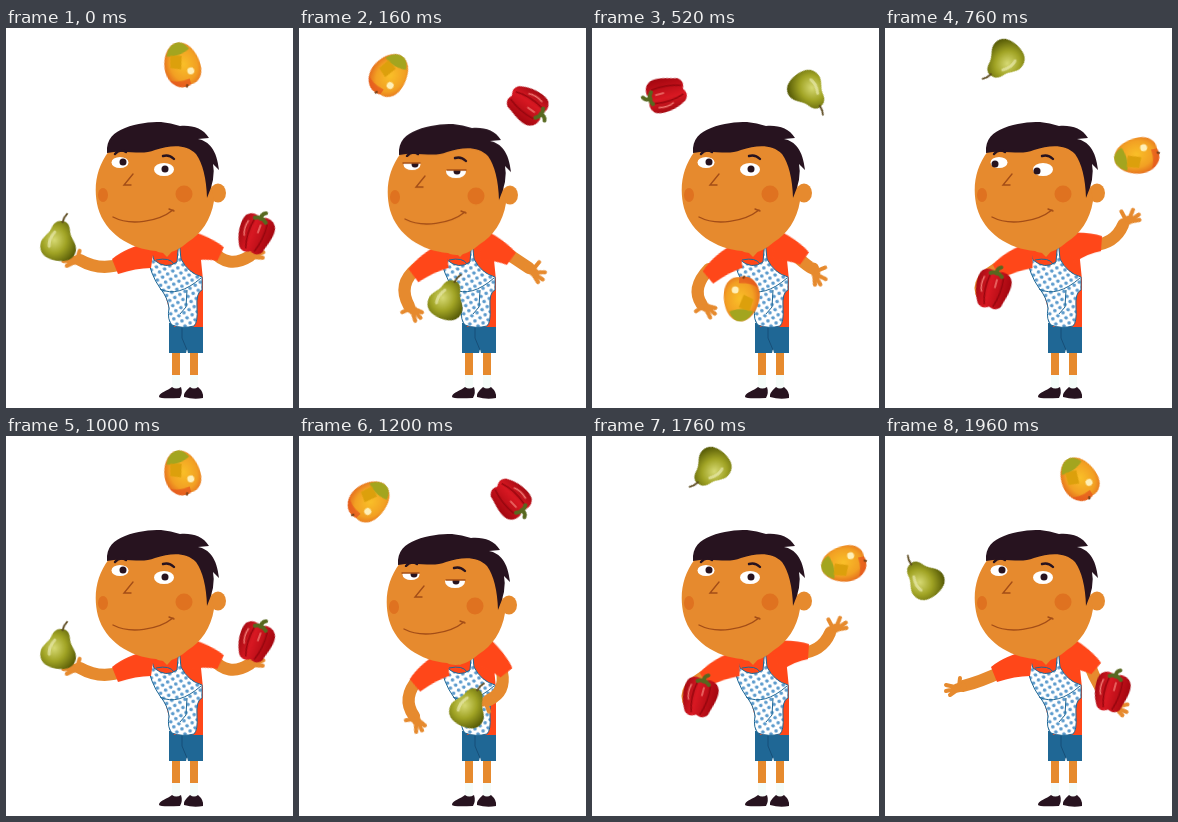
Write an HTML page without scripts that moves like this. It is 287 px wide and 380 px high and loops after 2000 ms.

```html
<!DOCTYPE html>
<html lang="en">
<head>
<meta charset="utf-8">
<title>Juggling boy</title>
<style>
html, body { margin: 0; width: 100%; height: 100%; overflow: hidden; background: #fff; }
svg { display: block; width: 287px; height: 380px; }
.skin { fill: #e68a2e; }
.red { fill: #ff4719; }
.dark { fill: #27131f; }
.line { fill: none; stroke: #a34d17; stroke-width: 1.4; stroke-linecap: round; }
.brow { fill: none; stroke: #27131f; stroke-width: 2.4; stroke-linecap: round; }
.seam { fill: none; stroke: #1f6795; stroke-width: 1; }
.arm { fill: none; stroke: #e68a2e; stroke-width: 12; stroke-linecap: round; }
.hand { fill: none; stroke: #e68a2e; stroke-width: 4; stroke-linecap: round; }
.palm { stroke-width: 9; }

/* motion advances in 40 ms ticks */
.move { animation: 1s -4ms infinite steps(2); }
.mango { animation-name: mango; }
.pepper { animation-name: pepper; }
.pear { animation-name: pear; }
.armL { animation-name: armL; }
.armR { animation-name: armR; }
.handL { animation-name: handL; }
.handR { animation-name: handR; }
.slvL { transform-origin: 147px 222px; animation: slvL 1s linear infinite; }
.slvR { transform-origin: 188px 216px; animation: slvR 1s linear infinite; }
.head { animation: nod 1s linear infinite; }
.half { animation: half 1s -4ms steps(1) infinite; }
.shut { animation: shut 1s -4ms steps(1) infinite; }
.look { animation: look 2s -4ms steps(1) infinite; }

@keyframes mango {
  0% { transform: translate(176px,37px) rotate(165deg); }
  8% { transform: translate(132px,31px) rotate(190deg); }
  16% { transform: translate(90px,47px) rotate(215deg); animation-timing-function: steps(1); }
  20% { transform: translate(70px,65px) rotate(228deg); }
  28% { transform: translate(37px,118px) rotate(280deg); animation-timing-function: steps(1); }
  32% { transform: translate(28px,156px) rotate(305deg); }
  40% { transform: translate(72px,246px) rotate(335deg); }
  48% { transform: translate(124px,271px) rotate(360deg); }
  56% { transform: translate(175px,270px) rotate(370deg); }
  64% { transform: translate(227px,256px) rotate(385deg); }
  72% { transform: translate(254px,165px) rotate(420deg); animation-timing-function: steps(1); }
  76% { transform: translate(252px,128px) rotate(440deg); }
  84% { transform: translate(233px,78px) rotate(475deg); }
  92% { transform: translate(206px,51px) rotate(500deg); animation-timing-function: steps(1); }
  96% { transform: translate(194px,43px) rotate(510deg); animation-timing-function: steps(1); }
  100% { transform: translate(176px,37px) rotate(525deg); }
}
@keyframes pepper {
  0% { transform: translate(250px,204px) rotate(20deg); }
  8% { transform: translate(252px,128px) rotate(75deg); }
  16% { transform: translate(230px,78px) rotate(125deg); animation-timing-function: steps(1); }
  20% { transform: translate(213px,64px) rotate(136deg); }
  28% { transform: translate(186px,42px) rotate(172deg); animation-timing-function: steps(1); }
  32% { transform: translate(167px,38px) rotate(185deg); }
  40% { transform: translate(130px,30px) rotate(207deg); }
  48% { transform: translate(93px,44px) rotate(230deg); }
  56% { transform: translate(51px,90px) rotate(280deg); }
  64% { transform: translate(32px,155px) rotate(325deg); }
  72% { transform: translate(85px,243px) rotate(368deg); animation-timing-function: steps(1); }
  76% { transform: translate(108px,259px) rotate(375deg); }
  84% { transform: translate(155px,270px) rotate(378deg); }
  92% { transform: translate(205px,264px) rotate(376deg); animation-timing-function: steps(1); }
  96% { transform: translate(227px,254px) rotate(375deg); animation-timing-function: steps(1); }
  100% { transform: translate(250px,204px) rotate(380deg); }
}
@keyframes pear {
  0% { transform: translate(54px,209px) rotate(10deg); }
  8% { transform: translate(105px,258px) rotate(15deg); }
  16% { transform: translate(150px,268px) rotate(22deg); animation-timing-function: steps(1); }
  20% { transform: translate(172px,268px) rotate(25deg); }
  28% { transform: translate(225px,258px) rotate(35deg); animation-timing-function: steps(1); }
  32% { transform: translate(244px,241px) rotate(40deg); }
  40% { transform: translate(255px,145px) rotate(85deg); }
  48% { transform: translate(232px,82px) rotate(127deg); }
  56% { transform: translate(205px,50px) rotate(157deg); }
  64% { transform: translate(177px,36px) rotate(182deg); }
  72% { transform: translate(140px,30px) rotate(210deg); animation-timing-function: steps(1); }
  76% { transform: translate(116px,35px) rotate(222deg); }
  84% { transform: translate(76px,56px) rotate(260deg); }
  92% { transform: translate(45px,105px) rotate(300deg); animation-timing-function: steps(1); }
  96% { transform: translate(36px,140px) rotate(320deg); animation-timing-function: steps(1); }
  100% { transform: translate(54px,209px) rotate(370deg); }
}
@keyframes armL {
  0%, 100% { d: path("M118 235Q95 244 74 232"); }
  8% { d: path("M118 237Q88 252 98 268"); }
  16% { d: path("M118 240Q98 256 110 278"); animation-timing-function: steps(1); }
  20% { d: path("M120 242Q102 262 115 280"); }
  28% { d: path("M118 238Q96 250 76 254"); animation-timing-function: steps(1); }
  32% { d: path("M118 240Q100 249 79 256"); }
  40% { d: path("M118 237Q90 250 86 262"); }
  48% { d: path("M116 242Q98 258 113 276"); }
  56% { d: path("M118 240Q100 262 106 276"); }
  64% { d: path("M118 236Q95 246 76 252"); }
  72% { d: path("M118 236Q90 248 88 258"); animation-timing-function: steps(1); }
  76% { d: path("M118 237Q88 252 98 268"); }
  84% { d: path("M118 240Q98 260 114 280"); }
  92% { d: path("M118 237Q98 250 88 260"); animation-timing-function: steps(1); }
  96% { d: path("M118 235Q95 246 78 250"); animation-timing-function: steps(1); }
}
@keyframes handL {
  0%, 100% { transform: translate(74px,232px) rotate(10deg); }
  8% { transform: translate(98px,267px) rotate(-170deg); }
  16% { transform: translate(110px,278px) rotate(-120deg); animation-timing-function: steps(1); }
  20% { transform: translate(115px,280px) rotate(-105deg); }
  28% { transform: translate(76px,254px) rotate(-10deg); animation-timing-function: steps(1); }
  32% { transform: translate(78px,256px) rotate(0deg); }
  40% { transform: translate(86px,262px) rotate(-90deg); }
  48% { transform: translate(113px,276px) rotate(-170deg); }
  56% { transform: translate(106px,276px) rotate(-90deg); }
  64% { transform: translate(76px,252px) rotate(0deg); }
  72% { transform: translate(88px,258px) rotate(-120deg); animation-timing-function: steps(1); }
  76% { transform: translate(98px,267px) rotate(-170deg); }
  84% { transform: translate(114px,280px) rotate(-110deg); }
  92% { transform: translate(88px,260px) rotate(-40deg); animation-timing-function: steps(1); }
  96% { transform: translate(77px,251px) rotate(0deg); animation-timing-function: steps(1); }
}
@keyframes armR {
  0%, 100% { d: path("M206 222Q222 242 244 228"); }
  8% { d: path("M206 218Q230 216 238 198"); }
  16% { d: path("M206 224Q224 236 230 240"); animation-timing-function: steps(1); }
  20% { d: path("M203 236Q207 256 190 264"); }
  28% { d: path("M205 230Q216 250 226 260"); animation-timing-function: steps(1); }
  32% { d: path("M204 230Q214 243 232 245"); }
  40% { d: path("M206 218Q230 218 240 202"); }
  48% { d: path("M206 223Q228 228 242 219"); }
  56% { d: path("M203 234Q210 254 200 262"); }
  64% { d: path("M205 228Q214 246 230 254"); }
  72% { d: path("M206 218Q232 216 241 204"); animation-timing-function: steps(1); }
  76% { d: path("M206 218Q230 216 238 197"); }
  84% { d: path("M205 226Q224 238 222 244"); }
  92% { d: path("M204 232Q214 250 212 260"); animation-timing-function: steps(1); }
  96% { d: path("M205 230Q212 250 228 268"); animation-timing-function: steps(1); }
}
@keyframes handR {
  0%, 100% { transform: translate(240px,229px) rotate(-15deg); }
  8% { transform: translate(238px,196px) rotate(-28deg); }
  16% { transform: translate(230px,240px) rotate(40deg); animation-timing-function: steps(1); }
  20% { transform: translate(190px,264px) rotate(160deg); }
  28% { transform: translate(226px,260px) rotate(40deg); animation-timing-function: steps(1); }
  32% { transform: translate(232px,245px) rotate(10deg); }
  40% { transform: translate(240px,201px) rotate(-25deg); }
  48% { transform: translate(243px,218px) rotate(-5deg); }
  56% { transform: translate(200px,262px) rotate(140deg); }
  64% { transform: translate(230px,254px) rotate(20deg); }
  72% { transform: translate(241px,203px) rotate(-25deg); animation-timing-function: steps(1); }
  76% { transform: translate(238px,195px) rotate(-28deg); }
  84% { transform: translate(222px,244px) rotate(60deg); }
  92% { transform: translate(212px,260px) rotate(100deg); animation-timing-function: steps(1); }
  96% { transform: translate(226px,267px) rotate(30deg); animation-timing-function: steps(1); }
}
@keyframes slvL {
  0%, 64%, 96%, 100% { transform: rotate(0deg); }
  8%, 76% { transform: rotate(-8deg); }
  20%, 48%, 56%, 86% { transform: rotate(-18deg); }
  32% { transform: rotate(-12deg); }
}
@keyframes slvR {
  0%, 100% { transform: rotate(22deg); }
  8%, 40%, 76% { transform: rotate(0deg); }
  20%, 56%, 90% { transform: rotate(48deg); }
  32%, 64%, 96% { transform: rotate(37deg); }
  48% { transform: rotate(14deg); }
}
@keyframes nod {
  0%, 12%, 44%, 100% { transform: translate(0,0); }
  20%, 34% { transform: translate(-2px,4px); }
}
@keyframes half {
  0%, 24%, 44% { opacity: 0; }
  16%, 40% { opacity: 1; }
}
@keyframes shut {
  0%, 40% { opacity: 0; }
  24% { opacity: 1; }
}
@keyframes look {
  0%, 50% { transform: translate(0,0); }
  28% { transform: translate(-7px,2px); }
}
</style>
</head>
<body>
<svg viewBox="0 0 287 380">
  <defs>
    <pattern id="dots" width="8.4" height="8.4" patternUnits="userSpaceOnUse" patternTransform="rotate(14)">
      <rect width="8.4" height="8.4" fill="#fff"/>
      <g fill="#5c9bcd"><circle cx="2.2" cy="2.2" r="1.8"/><circle cx="6.4" cy="6.4" r="1.8"/></g>
    </pattern>
    <radialGradient id="gold" cx=".45" cy=".5" r=".62">
      <stop offset="0" stop-color="#f9bf28"/><stop offset=".6" stop-color="#f2a023"/><stop offset="1" stop-color="#e2601c"/>
    </radialGradient>
    <radialGradient id="olive" cx=".36" cy=".5" r=".66">
      <stop offset="0" stop-color="#d6d973"/><stop offset=".5" stop-color="#a0a324"/><stop offset="1" stop-color="#565a06"/>
    </radialGradient>
    <linearGradient id="ruby">
      <stop offset="0" stop-color="#a50b13"/><stop offset=".4" stop-color="#d81822"/><stop offset="1" stop-color="#a3060f"/>
    </linearGradient>
  </defs>

  <!-- legs -->
  <path class="skin" d="M166 322h8v25h-8zM184 322h8v25h-8z"/>
  <path fill="#f5fcf9" d="M166 347h8v14h-8zM184 347h8v14h-8z"/>
  <path class="dark" d="M166 359C162 363 153 364 153 369Q154 371 174 370Q177 365 175 359Q170 362 166 359zM184 359Q177 365 178 369Q188 372 197 370Q198 364 192 359Q188 362 184 359z"/>
  <path fill="#1f6795" d="M163 295H197V325H182L181 321L180 325H163z"/>
  <path d="M176 298V310L181 322" stroke="#174f78" fill="none"/>

  <!-- shirt and apron -->
  <path class="red" d="M138 219L180 205L194 222L197 252L197 299H168L160 270L143 232z"/>
  <path fill="url(#dots)" stroke="#1f6795" d="M140 224L145 222L148 232Q160 242 171 234L173 212L175 231Q182 245 196 249L196 262Q190 264 191 280Q192 294 188 298Q176 301 166 297Q161 292 163 280Q162 270 154 260Q145 248 140 224z"/>
  <path class="seam" d="M154 261Q172 270 195 250M181 262L180 279L174 286M168 236Q164 229 150 232"/>
  <path class="skin" d="M150 218L161 229L171 218z"/>

  <!-- arms -->
  <path class="arm move armL" d="M118 235Q95 244 74 232"/>
  <g class="move handL"><path class="hand palm" d="M0 0L-5 1"/><path class="hand" d="M-3 0L-2 -9M-7 0L-16 -2M-7 2L-16 4M-5 3L-12 8"/></g>
  <path class="arm move armR" d="M206 222Q222 242 244 228"/>
  <g class="move handR"><path class="hand palm" d="M0 0L6 0"/><path class="hand" d="M4 -1L4 -11M8 -1L15 -7M8 1L18 0M7 2L16 5"/></g>
  <path class="red slvL" d="M149 213Q120 219 106 231L112 246Q130 240 145 240z"/>
  <path class="red slvR" d="M176 205Q204 203 217 208L216 223Q204 225 190 234z"/>

  <!-- head -->
  <g class="head">
    <ellipse class="skin" cx="212" cy="165" rx="8" ry="9.5"/>
    <path class="skin" d="M103 123C90 140 87 160 92 180C99 205 124 221 150 223C160 228 172 223 182 214C195 206 205 192 208 173L198 115H115z"/>
    <path class="dark" d="M101 125C100 111 108 104 119 100C131 95 144 94 155 94Q165 95 174 98C186 97 197 100 203 110L192 111C203 113 211 122 213 142L207 136Q210 150 201 170Q200 140 190 126C180 116 165 117 149 122C135 128 120 121 101 125z"/>
    <path class="brow" d="M109 126Q114 120 120 124M157 128Q163 126 168 131"/>
    <g fill="#fff"><ellipse cx="114" cy="134.500" rx="8.5" ry="5.6"/><ellipse cx="158" cy="141.500" rx="10" ry="6.6"/></g>
    <g class="look dark"><circle cx="117" cy="134" r="3.5"/><circle cx="159" cy="141" r="3.5"/></g>
    <path class="half skin" d="M104 133V127H124V133zM147 140V133H170V140z"/>
    <path class="half line" d="M105 133H122M149 140H168"/>
    <g class="shut" fill="#ab5a1d"><ellipse cx="114" cy="134.500" rx="8.500" ry="5.6"/><ellipse cx="158" cy="141" rx="10" ry="6.4"/></g>
    <g fill="#df7220"><ellipse cx="97" cy="167" rx="5" ry="7"/><circle cx="178" cy="166" r="8.5"/></g>
    <path class="line" d="M127 146L118 157L125 157M107 189C124 198 152 194 167 182M163 181L168 183"/>
  </g>

  <!-- produce -->
  <g class="move mango">
    <path fill="url(#gold)" d="M-4 -21C8 -26 18 -15 18 -3C18 10 10 23 0 23C-11 23 -18 9 -18 -4C-18 -15 -12 -21 -4 -21z"/>
    <path fill="#a3a51f" d="M-11 14Q0 8 13 12Q8 23 0 23Q-7 23 -11 14z"/>
    <path fill="#dca00c" d="M2 -4L12 0L9 12L-2 9z"/>
    <path fill="#e5521e" opacity=".7" d="M-4 -21Q9 -25 16 -12Q8 -17 -4 -15z"/>
    <circle cx="-7" cy="-8" r="3.5" fill="#fff0b8"/>
    <path d="M0 -20L1 -23" stroke="#713d16" stroke-width="2"/>
  </g>
  <g class="move pepper">
    <path fill="url(#ruby)" d="M-15 -13C-9 -19 -4 -16 0 -15C7 -19 15 -16 17 -9C19 0 14 11 13 17C9 23 4 21 1 20C-4 24 -10 22 -12 17C-17 8 -19 -6 -15 -13z"/>
    <path d="M-6 -11Q-9 5 -4 19M8 -11Q10 4 5 19" fill="none" stroke="#96060e" stroke-width="1.5"/>
    <path d="M-11 -8Q-13 1 -10 7M2 -8V0" fill="none" stroke="#f07872" stroke-width="1.5" stroke-linecap="round"/>
    <path d="M-6 -13Q0 -17 6 -12M0 -14Q-1 -19 3 -21" fill="none" stroke="#57681f" stroke-width="4" stroke-linecap="round"/>
  </g>
  <g class="move pear">
    <path fill="url(#olive)" d="M-1 -16C5 -17 8 -12 9 -7C11 0 18 3 18 11C18 20 10 24 0 24C-11 24 -18 19 -18 10C-18 3 -12 0 -10 -7C-9 -12 -6 -16 -1 -16z"/>
    <path d="M0 -15Q0 -20 3 -24" fill="none" stroke="#5c4a20" stroke-width="1.8" stroke-linecap="round"/>
    <path d="M-6 -4Q-11 4 -9 11" fill="none" stroke="#f0f0bd" stroke-width="3" stroke-linecap="round" opacity=".6"/>
  </g>
</svg>
</body>
</html>
```
